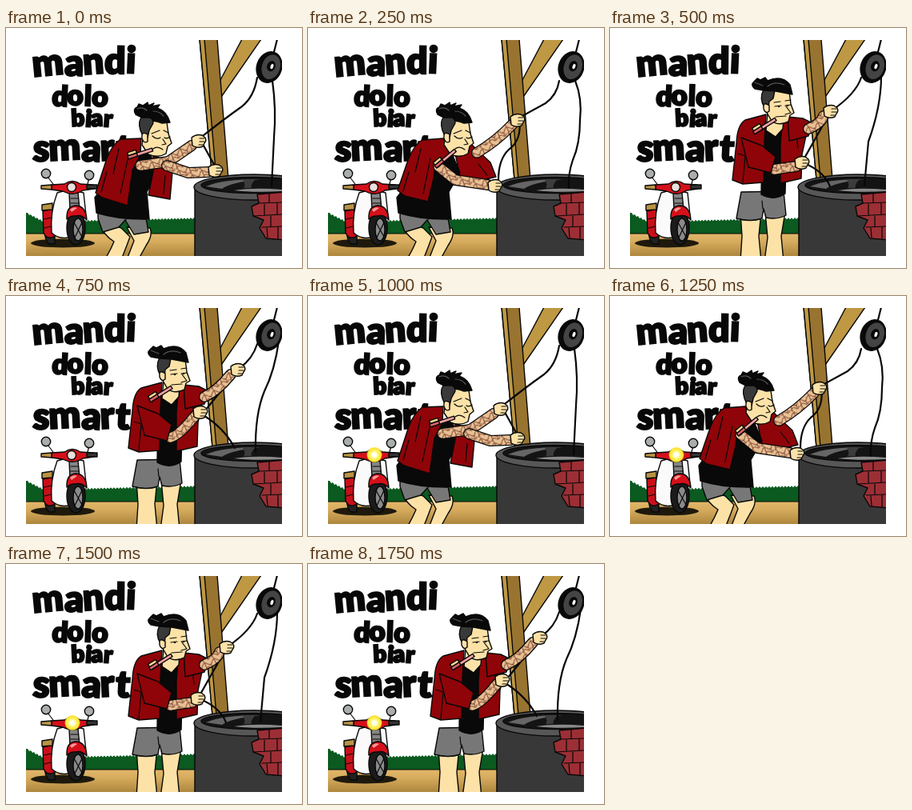
An HTML page for the animation above (2000 ms loop, 370 by 300 pixels).

```html
<!DOCTYPE html>
<html lang="id">
<head>
<meta charset="utf-8">
<title>Mandi dolo</title>
<style>
html, body { margin: 0; width: 100%; height: 100%; overflow: hidden; background: #fff; }
svg { display: block; }
text { font-family: Lato, Inter, sans-serif; font-weight: 900; fill: #080808; stroke: #080808; stroke-width: 2.2; }
.o { stroke: #080808; stroke-width: 1.4; stroke-linejoin: round; stroke-linecap: round; }
.l { fill: none; stroke: #080808; stroke-width: 1.2; stroke-linecap: round; stroke-linejoin: round; }
.rope { fill: none; stroke: #080808; stroke-width: 2.2; stroke-linecap: round; }
.red { fill: #8f0408; }
.skin { fill: #fde2a8; }
.black { fill: #090909; }
.shaved { fill: #393939; }
.grey { fill: #777; }
</style>
</head>
<body>
<svg width="370" height="300" viewBox="0 0 370 300">
<defs>
  <clipPath id="stage"><path d="M25 15H345V285H25Z"/></clipPath>
  <pattern id="ink" width="13" height="12" patternUnits="userSpaceOnUse" patternTransform="rotate(-25)">
    <path d="M0 0H13V12H0Z" fill="#e8c193"/>
    <path d="M0 3Q4 -1 7 4T13 3M1 10Q5 5 8 9T13 8M4 0L3 12M9 5Q12 7 9 11" fill="none" stroke="#854b36" stroke-width="1.1"/>
  </pattern>
  <linearGradient id="soil" x2="0" y2="1"><stop stop-color="#e2b769"/><stop offset=".35" stop-color="#d7ac5e"/><stop offset="1" stop-color="#ad873e"/></linearGradient>
  <radialGradient id="glow"><stop offset=".25" stop-color="#fffff0"/><stop offset=".5" stop-color="#fff36a"/><stop offset=".85" stop-color="#fbe32c"/><stop offset="1" stop-color="#f8d423" stop-opacity="0"/></radialGradient>
</defs>
<g clip-path="url(#stage)">
  <g id="words">
    <text transform="translate(34 61) rotate(-2.5)" font-size="46" rotate="-3 4 -2 3 5">mandi</text>
    <text transform="translate(57 97)" font-size="35" rotate="3 -4 2 5">dolo</text>
    <text transform="translate(82 123)" font-size="29" rotate="-3 4 -3 4">biar</text>
    <text transform="translate(33 166)" font-size="47" rotate="3 -3 3 -3 3">smart</text>
  </g>

  <path id="bush" fill="#0b5a20"/>
  <path d="M25 257H345V285H25Z" fill="url(#soil)"/>
  <path d="M25 257H240" class="l"/>

  <g id="scooter">
    <ellipse cx="71" cy="269" rx="40" ry="5.5" fill="#1e190c"/>
    <path class="l" d="M62 199L52 186M101 199L104 187"/>
    <g fill="#a9adac" class="o"><circle cx="50" cy="182" r="5.7"/><circle cx="104" cy="184" r="5.7"/></g>
    <path class="o" fill="#222" d="M48 250H61V270H54Q48 266 48 250Z"/>
    <path class="o" fill="#c90f19" d="M46 229L58 226 61 260Q52 266 47 256Z"/>
    <path class="o" fill="#b99445" d="M45 221L58 219 58 227 45 228Z"/>
    <path class="l" d="M47 239L57 237M48 250L56 248"/>
    <path class="o" fill="#fafafa" d="M64 206Q80 200 97 206L100 234 78 238 78 262Q65 264 57 256Q55 230 64 206Z"/>
    <path class="o" fill="#858585" d="M79 206H90L92 227H80Z"/>
    <path class="l" d="M81 213H90M81 219H91"/>
    <ellipse class="o" cx="87.5" cy="250" rx="11.5" ry="21" fill="#1b1b1b"/>
    <ellipse cx="90" cy="252" rx="6" ry="14" fill="#8a8a8a" class="o"/>
    <path class="l" d="M85 243L95 261M95 243L86 262"/>
    <path class="o" fill="#d5101a" d="M76 239Q75 222 88 222Q100 223 101 240Q95 233 87 235Q81 234 76 239Z"/>
    <path fill="#f39a95" d="M80 227Q84 223 89 225L82 230Z"/>
    <path class="o" fill="#d5101a" d="M57 196L73 195Q83 188 93 195L109 196 110 201 96 203Q84 211 71 204L57 202Z"/>
    <path class="o" fill="#b99445" d="M44 197L57 196 57 202 44 201Z"/>
    <path class="o" fill="#333" d="M101 196H114V201H101Z"/>
    <circle class="o" cx="82" cy="199" r="5.5" fill="#e9dfdc"/>
    <circle id="lamp" cx="83" cy="198.5" r="10" fill="url(#glow)"/>
  </g>

  <g class="o">
    <path fill="#be9843" d="M295 14H319L265 92 259 82Z"/>
    <path fill="#997430" d="M242 14H264L278 189H258Z"/>
    <path fill="#be9843" d="M242 14H248L263 189H258Z"/>
  </g>

  <g id="well">
    <path class="o" fill="#383838" d="M236 199V290H350V199Z"/>
    <ellipse class="o" cx="310" cy="199" rx="75" ry="16" fill="#575757"/>
    <ellipse class="o" cx="309" cy="196.5" rx="65" ry="10" fill="#141414"/>
    <path d="M250 198Q270 189 318 189Q281 193 270 201Z" fill="#666"/>
    <path d="M296 190L312 189Q305 196 307 200L297 200Q300 196 296 190Z" fill="#3c3c3c"/>
    <path d="M285 203Q310 199 345 202V204Q310 206 285 203Z" fill="#8a8a8a"/>
    <path class="o" fill="#9c2f35" d="M314 208L350 205V265L325 263 317 250 322 240 309 235 307 223 316 219Z"/>
    <path class="l" d="M315 219L345 218M309 235L345 233M320 249L345 248M329 207V218M323 220V234M339 219V233M331 235V248M326 250L327 262M340 249V264"/>
  </g>

  <g id="ropes"></g>
  <g id="pulley" class="o" transform="rotate(18 329 49)">
    <ellipse cx="329" cy="49" rx="15.5" ry="19.5" class="black"/>
    <ellipse cx="331" cy="48" rx="12" ry="16.5" fill="#444"/>
    <ellipse cx="331" cy="47" rx="4.5" ry="6" class="black"/>
    <ellipse cx="332" cy="47" rx="2.5" ry="4" fill="#fff"/>
  </g>
  <g id="person"></g>
</g>
</svg>
<script>
const el = id => document.getElementById(id);
const path = (cls, d, extra = "") => `<path class="${cls}" d="${d}" ${extra}/>`;

// Grassy edge with small alternating tips.
let grass = "M25 257V231";
for (let x = 27; x <= 240; x += 2) {
  const top = x < 45 ? 231 + (x - 25) / 2 : 241 - Math.max(0, x - 100) / 45;
  grass += `L${x} ${top + (x % 4 === 1 ? 1 : -1)}`;
}
el("bush").setAttribute("d", grass + "V257Z");

const brush = (x, y, angle) => `<g transform="translate(${x} ${y}) rotate(${angle})">
  <path class="o" fill="#f5a3a5" d="M0 -2L-30 -2V2H0Z"/>
  <path class="o" fill="#f8d98a" d="M-31 -6H-20V-2H-31Z"/>
  <path class="o" fill="#d9626c" d="M-32 -2H-20V2H-32Z"/></g>`;

function arm(d, x, y) {
  return `<g fill="none" stroke-linecap="round" stroke-linejoin="round">
    <path d="${d}" stroke="#080808" stroke-width="14"/>
    <path d="${d}" stroke="url(#ink)" stroke-width="11.5"/></g>
    <g transform="translate(${x} ${y})">
    ${path("o skin", "M-9 -4Q-3 -9 4 -7L8 -4Q10 0 7 3L5 7Q-2 10 -8 6Z")}
    ${path("l", "M1 -3L7 -3M1 1L7 1M0 5L5 5")}</g>`;
}

const bentHead = path("o skin", "M173 124L181 116 201 118 203 132 207 144 202 148 200 157Q190 163 178 158L170 146Z")
  + path("o shaved", "M168 128Q164 116 171 110L183 112 184 119 179 128 177 137 171 135Z")
  + path("o skin", "M177 133Q169 128 170 138Q172 145 177 142Z")
  + path("o black", "M170 112L162 108Q158 101 164 99L166 95 171 97 177 93 178 97 185 94 182 98 192 96 189 100Q201 104 205 118L195 119 184 115 180 112Z")
  + path("l", "M183 135Q188 140 193 137M198 137Q201 139 205 136M182 132L192 128M197 128L203 131M196 139L200 145 195 146M182 153Q188 146 196 152")
  + path("l", "M164 101Q171 98 176 103M184 104Q192 104 197 110", 'style="stroke:#555"');

const bentLegs = path("o skin", "M118 240L144 250 155 261Q150 275 143 292H122Q130 279 135 267Q122 259 118 246Z")
  + path("o skin", "M151 249L180 250Q184 259 175 272L164 292H150L160 266Z")
  + path("o grey", "M115 228L115 238 121 255 141 249 149 240 160 258 178 255 174 232Z")
  + path("l", "M150 240L149 232");

const bentShirt = path("o black", "M150 157L120 200 111 212 113 231Q142 240 179 239L176 205 190 181 180 157Z");

const bentPull = bentLegs + bentShirt
  + path("o red", "M169 138L143 139Q132 147 126 163L112 206 120 212 152 222 158 178 168 158Z")
  + path("o red", "M184 160L199 164 208 180 205 214 178 209 184 179Z")
  + path("l", "M141 151L134 182M153 160L143 207M126 180L119 205M199 184L197 207")
  + arm("M168 172L203 167 232 147", 241, 141)
  + arm("M201 172L228 181 253 180", 262, 178)
  + bentHead + brush(183, 152, -18);

const bentReach = bentLegs
  + path("o red", "M184 157L203 144 214 155 228 168 235 186 211 192 190 186Z")
  + bentShirt
  + path("o red", "M169 138L143 140Q132 146 124 168L112 203 121 210 150 217 157 188 159 170 179 157Z")
  + path("l", "M141 151L134 180M153 163L144 207M126 180L119 204M213 170L224 184")
  + arm("M211 156Q235 142 255 121", 262, 115)
  + arm("M163 173L184 190 225 196", 234, 197)
  + bentHead + brush(184, 153, -40);

const standHead = path("o skin", "M197 106L195 128 207 136 216 126 217 112Z")
  + path("o skin", "M195 88L203 78 224 79 226 95 230 106 225 109 223 117Q211 123 202 116L195 104Z")
  + path("o shaved", "M193 99Q186 88 192 77L206 78 204 88 199 92 198 101Z")
  + path("o skin", "M199 97Q191 91 192 101Q194 108 199 104Z")
  + path("o black", "M192 78L181 76Q175 71 180 67L184 63 188 65 194 62 197 66Q215 58 225 71L228 83 207 79Z")
  + path("l", "M205 93L213 92M219 91L226 90M206 98L214 97M219 97L226 96M220 98L226 106 219 108M207 111L220 110")
  + `<g class="black"><circle cx="211" cy="98" r="1.2"/><circle cx="222" cy="97" r="1.2"/></g>`
  + path("l", "M197 73Q206 66 218 71M181 68L191 72", 'style="stroke:#555"');

const standBody = path("o skin", "M163 230H189L186 260 189 292H163L165 260Z")
  + path("o skin", "M194 230H219L214 260 217 292H193L197 262Z")
  + path("o grey", "M164 205L158 238Q176 243 190 238L192 226 195 237Q209 240 220 234L217 204Z")
  + path("o black", "M190 122L189 208Q205 217 219 207L221 126Z")
  + path("o red", "M195 108L169 115Q159 121 158 144L153 190 166 195 192 193 193 143Z")
  + path("o red", "M216 111L237 114 246 130 240 158 239 188 213 194 213 145Z")
  + path("l", "M160 157L169 160 166 193M191 226L190 216M232 125L235 150M194 117L201 133 215 119");

function standing(top, low) {
  const [x, y] = top, [u, v] = low;
  return standBody
    + path("o red", "M222 111L241 113 253 119 248 135 224 141Z")
    + arm(`M248 126Q264 119 ${x - 9} ${y + 6}`, x, y)
    + arm(`M205 177Q216 175 ${u - 7} ${v + 5}`, u, v)
    + path("o red", "M164 137L190 147 207 161 201 181 173 174Z")
    + standHead + brush(207, 114, -32);
}

const poses = [
  { person: bentPull,
    ropes: ["M314 62Q310 86 295 98Q271 115 242 138L263 176", "M333 66Q338 102 335 137L332 198"] },
  { person: bentReach,
    ropes: ["M314 66Q311 84 297 94L264 112Q268 140 251 152Q238 164 238 190", "M334 66Q343 88 340 115Q340 145 331 165Q325 182 326 200"] },
  { person: standing([276, 104], [240, 168]),
    ropes: ["M314 62Q307 83 276 104L240 168Q267 178 275 198", "M339 60Q339 98 323 142L318 197"] },
  { person: standing([290, 92], [243, 145]),
    ropes: ["M314 60Q308 79 292 90L245 148Q272 164 286 190", "M341 56Q336 93 323 119Q311 148 312 195"] }
];

let shown = -1;
function draw(time) {
  const step = Math.floor(time % 2000 / 250);
  if (step !== shown) {
    const pose = poses[step % 4];
    el("person").innerHTML = pose.person;
    el("ropes").innerHTML = [...pose.ropes, "M339 14L334 34"].map(d => path("rope", d)).join("");
    el("lamp").style.display = step < 4 ? "none" : "";
    shown = step;
  }
}

const start = performance.now();
function tick() {
  draw(performance.now() - start);
  requestAnimationFrame(tick);
}
tick();
</script>
</body>
</html>
```
